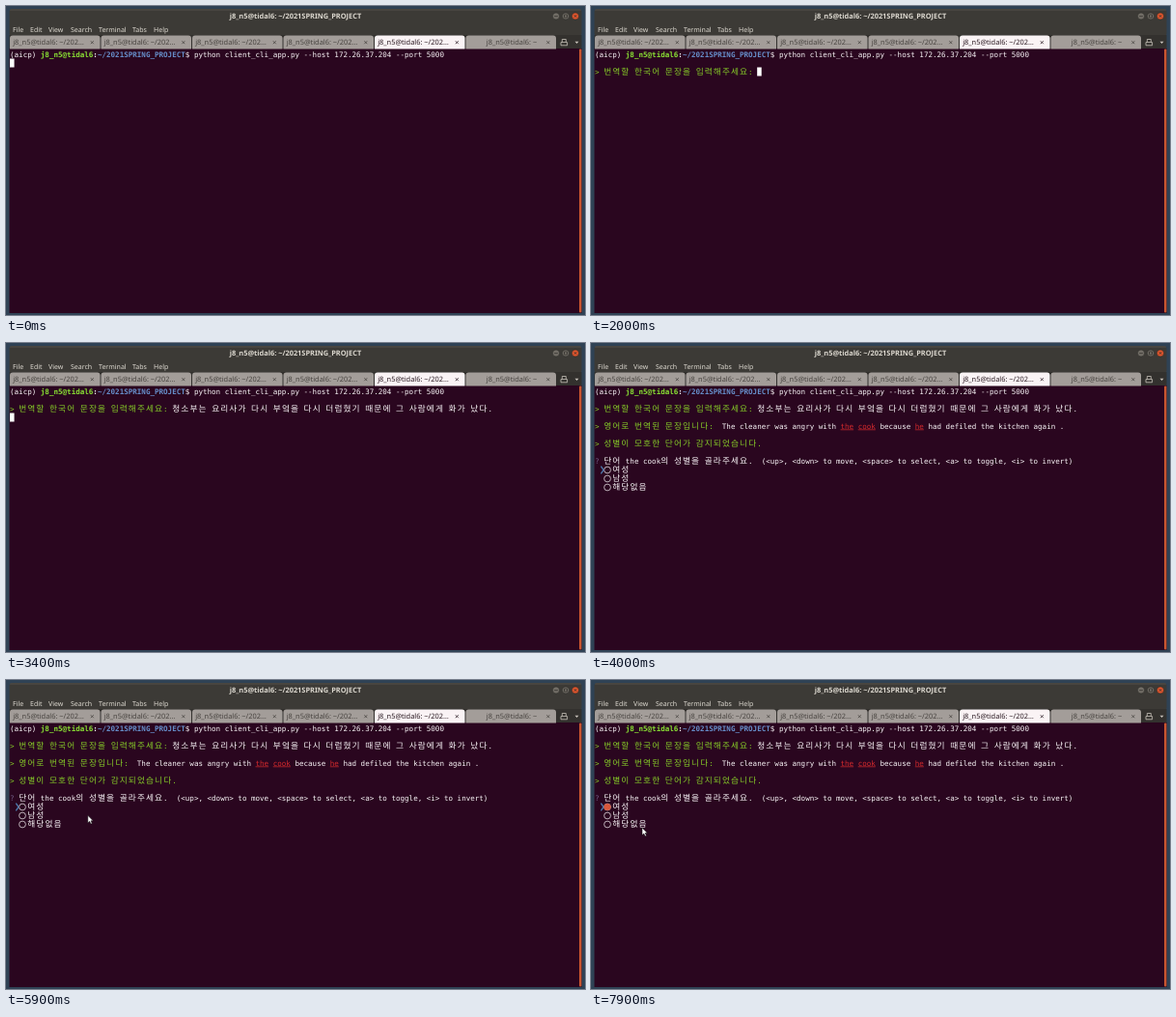
Write an HTML page that moves like this. It is 600x320 px and loops after 8 s.

```html
<!DOCTYPE html>
<html lang="ko">
<head>
<meta charset="utf-8">
<title>Terminal</title>
<style>
  html, body { margin: 0; width: 100%; height: 100%; overflow: hidden; background: #2f4255; }
  svg { display: block; width: 600px; height: 320px; }
  text { white-space: pre; text-rendering: geometricPrecision; }
  .mono { font: 7.55px "DejaVu Sans Mono", "Noto Sans CJK KR", "Noto Sans CJK", monospace; }
  .hangul { font: 8.7px "Noto Sans CJK KR", "Noto Sans CJK", sans-serif; text-anchor: middle; }
  .ui { font: 7px "Noto Sans", "Open Sans", sans-serif; }
  .bold { font-weight: bold; }
</style>
</head>
<body>
<svg id="stage" viewBox="0 0 600 320"></svg>
<script>
const stage = document.getElementById('stage');
const LOOP = 8000;
const CELL = 4.545, ROW = 9, LEFT = 4, TOP = 45.5;
const WHITE = '#faf6f8', GREEN = '#86cc28', RED = '#d42a2d';
const USER = 'j8_n5@tidal6';

function add(parent, tag, attrs, content) {
  const node = document.createElementNS('http://www.w3.org/2000/svg', tag);
  for (const key in attrs) node.setAttribute(key, attrs[key]);
  if (content) node.textContent = content;
  parent.append(node);
  return node;
}
const rect = (parent, x, y, width, height, fill, rx = 0) =>
  add(parent, 'rect', { x, y, width, height, fill, rx });
const line = (parent, d, stroke, width = 1) =>
  add(parent, 'path', { d, stroke, 'stroke-width': width, fill: 'none' });
const label = (parent, x, y, content, fill, style = {}) =>
  add(parent, 'text', { x, y, fill, class: 'ui', ...style }, content);
const colX = col => LEFT + col * CELL;
const rowY = row => TOP + row * ROW;

// Writes on the character grid; Hangul takes two cells. Returns the next column.
function write(parent, row, col, content, fill, bold = false) {
  const y = rowY(row) + 7.1;
  for (const run of content.match(/[가-힣]+|[^가-힣]+/g)) {
    const wide = /[가-힣]/.test(run), step = wide ? 2 : 1;
    const x = [...run].map((_, i) => colX(col + i * step + (wide ? 0.9 : 0)).toFixed(2)).join(' ');
    add(parent, 'text', { x, y, fill, class: wide ? 'hangul' : 'mono' + (bold ? ' bold' : '') }, run);
    col += run.length * step;
  }
  return col;
}
function writeRuns(parent, row, runs) {
  let col = 0;
  for (const [content, fill, bold] of runs) {
    const next = write(parent, row, col, content, fill, bold);
    if (fill === RED) rect(parent, colX(col), rowY(row) + 8, (next - col) * CELL, 0.7, RED);
    col = next;
  }
}

function drawWindow() {
  rect(stage, 0, 0, 600, 320, '#2f4255');
  rect(stage, 3.5, 3, 593, 28, '#3c3a36', 3);
  rect(stage, 4, 3.5, 592, 1, '#54514b', 1);
  rect(stage, 3.5, 30, 593, 14.5, '#33312e');
  rect(stage, 3.5, 44, 593, 274, '#2a061f');
  rect(stage, 594, 44.5, 2.4, 273, '#c9552f', 1);

  label(stage, 300, 13.3, USER + ': ~/2021SPRING_PROJECT', '#dcd8cf',
    { 'text-anchor': 'middle', class: 'ui bold', style: 'font-size:7.4px' });
  const menu = { File: 7, Edit: 25, View: 44, Search: 67, Terminal: 96, Tabs: 131, Help: 153 };
  for (const name in menu) label(stage, menu[name], 27, name, '#dedad1');

  for (const [cx, fill] of [[570, '#716d66'], [580, '#716d66'], [590, '#e4562d']])
    add(stage, 'circle', { cx, cy: 10.5, r: 3.6, fill, stroke: '#2b2a27', 'stroke-width': 0.6 });
  line(stage, 'M568.2 10.7h3.6M578.5 9h3v3h-3zM588.7 9.2l2.6 2.6m0-2.6l-2.6 2.6', '#33302c', 0.8);

  for (let i = 0; i < 6; i++) {
    const x = 4 + i * 94.5, active = i === 4, ink = active ? '#2a1a22' : '#484440';
    add(stage, 'path', {
      d: `M${x} 44.5V33.5q0-3 3-3h87.5q3 0 3 3v11z`, fill: active ? '#faf3f5' : '#a39d99'
    });
    const size = { style: 'font-size:7.4px' };
    if (i < 5) label(stage, x + 3.2, 40.2, USER + ': ~/202…', ink, size);
    else label(stage, 524, 40.2, USER + ': ~', ink, { ...size, 'text-anchor': 'middle' });
    line(stage, `M${x + 83.8} 36.2l3 3m0-3l-3 3`, ink, 0.8);
  }
  line(stage, 'M576.3 37.5v-3h4v3M575 40.8v-3.2h6.6v3.2z', '#c9c4bc', 0.8);
  add(stage, 'path', { d: 'M589.5 36.7h4l-2 2.4z', fill: '#c9c4bc' });
}

function drawMenu(parent) {
  ['여성', '남성', '해당없음'].forEach((name, i) => {
    add(parent, 'circle', {
      cx: 17, cy: rowY(9 + i) + 5, r: 3.4, fill: 'none', stroke: WHITE, 'stroke-width': 0.7
    });
    write(parent, 9 + i, 4, name, WHITE);
  });
  line(parent, `M10.3 ${rowY(9) + 1.2}l2.7 3.8-2.7 3.8`, '#4f7cb0', 1.3);
}

drawWindow();
writeRuns(stage, 0, [
  ['(aicp) ', WHITE], [USER, '#8ae234', true], [':', WHITE, true],
  ['~/2021SPRING_PROJECT', '#6790cc', true],
  ['$ python client_cli_app.py --host 172.26.37.204 --port 5000', WHITE]
]);

const group = () => add(stage, 'g', {});
const prompt = group(), sentence = group(), result = group(), chosen = group();
write(prompt, 2, 0, '> 번역할 한국어 문장을 입력해주세요:', GREEN);
write(sentence, 2, 37, '청소부는 요리사가 다시 부엌을 다시 더럽혔기 때문에 그 사람에게 화가 났다.', WHITE);
writeRuns(result, 4, [
  ['> 영어로 번역된 문장입니다:  ', GREEN], ['The cleaner was angry with ', WHITE],
  ['the', RED], [' ', WHITE], ['cook', RED], [' because ', WHITE], ['he', RED],
  [' had defiled the kitchen again .', WHITE]
]);
write(result, 6, 0, '> 성별이 모호한 단어가 감지되었습니다.', GREEN);
writeRuns(result, 8, [
  ['? ', '#75608a'], ['단어 the cook의 성별을 골라주세요.  ', WHITE],
  ['(<up>, <down> to move, <space> to select, <a> to toggle, <i> to invert)', WHITE]
]);
drawMenu(result);
add(chosen, 'circle', { cx: 17, cy: rowY(9) + 5, r: 3.6, fill: '#d8583c' });

const caret = rect(stage, 0, 0, CELL, ROW, '#ffffff');
const pointer = add(stage, 'path', {
  d: 'M0 0V7.6L1.8 6 3.1 8.8 4.4 8.2 3.1 5.5H5.4Z',
  fill: '#fff', stroke: '#111', 'stroke-width': 0.5
});

const APPEAR = { prompt: 100, paste: 2300, enter: 2700, result: 3700, pointer: 4700, chosen: 7200 };
const pointerPath = [[4700, 101.5, 142.5], [5700, 101.5, 142.5], [6400, 17.5, 131.5],
  [7700, 17.5, 131.5], [7900, 53, 153]];

function pointerAt(t) {
  const i = pointerPath.findIndex(p => p[0] > t);
  if (i < 0) return pointerPath.at(-1).slice(1);
  const [t0, x0, y0] = pointerPath[Math.max(0, i - 1)], [t1, x1, y1] = pointerPath[i];
  const u = Math.max(0, (t - t0) / (t1 - t0 || 1)), k = u * u * (3 - 2 * u);
  return [x0 + (x1 - x0) * k, y0 + (y1 - y0) * k];
}
const show = (node, visible) => node.setAttribute('visibility', visible ? 'visible' : 'hidden');

function render(now) {
  const t = Math.floor(now % LOOP / 100) * 100;
  show(prompt, t >= APPEAR.prompt);
  show(sentence, t >= APPEAR.paste);
  show(result, t >= APPEAR.result);
  show(chosen, t >= APPEAR.chosen);
  show(caret, t < APPEAR.result);
  show(pointer, t >= APPEAR.pointer);

  const [row, col] = t < APPEAR.prompt ? [1, 0] : t < APPEAR.paste ? [2, 37]
    : t < APPEAR.enter ? [2, 110] : [3, 0];
  caret.setAttribute('x', colX(col));
  caret.setAttribute('y', rowY(row));
  pointer.setAttribute('transform', `translate(${pointerAt(t)})`);
  requestAnimationFrame(() => render(performance.now()));
}
render(0);
</script>
</body>
</html>
```
